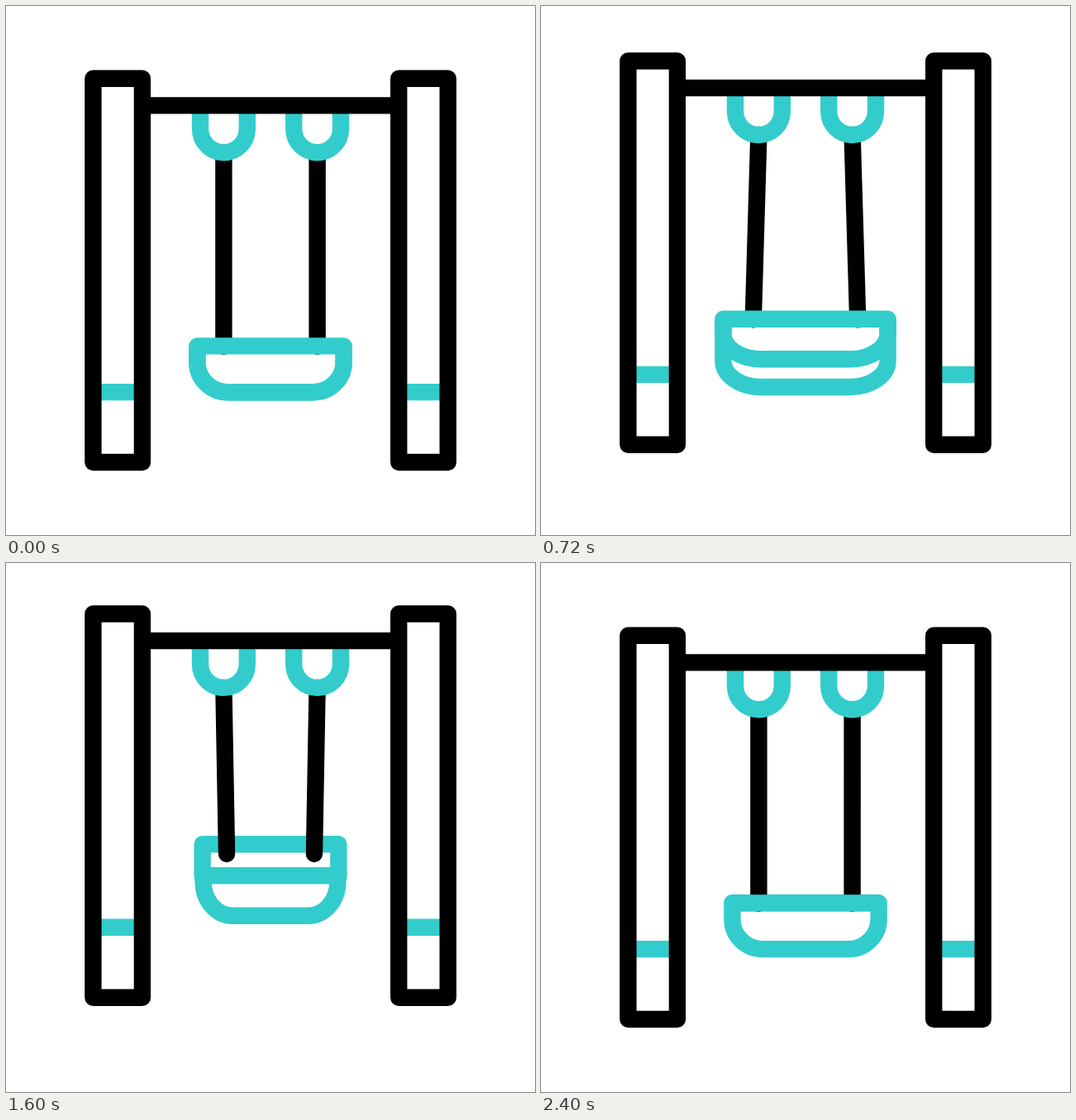
Animation of 640 by 640 pixels, one loop 2.56 s. Source, as an HTML page:

```html
<!DOCTYPE html>
<html lang="en">
<head>
<meta charset="utf-8">
<title>Swing</title>
<style>
  html, body { margin: 0; width: 100%; height: 100%; overflow: hidden; background: #fff; }
  svg { display: block; width: 100%; height: 100%; }
  path, rect { fill: none; stroke: #000; stroke-width: 20.4; stroke-linejoin: round; }
  .teal { stroke: #33cccc; }
  .rope { stroke-linecap: round; }
</style>
</head>
<body>
<svg viewBox="0 0 640 640">
  <g id="swing">
    <path id="rear" class="teal"/>
    <path id="ropes" class="rope"/>
    <path id="front" class="teal"/>
    <path class="teal" d="M235 120V148.8a28.4 28.4 0 0 0 56.8 0V120M348.2 120V148.8a28.4 28.4 0 0 0 56.8 0V120"/>
    <path d="M165 120.4H475"/>
    <path class="teal" d="M105.4 467.1H165M475.2 467.1H534.6"/>
    <rect x="105.4" y="87.8" width="59.5" height="464.2"/>
    <rect x="475.2" y="87.8" width="59.5" height="464.2"/>
  </g>
</svg>
<script>
const LOOP = 2560, STEP = 40, DELAY = 20, QUARTER = 600;
const $ = id => document.getElementById(id);
const swing = $('swing'), rear = $('rear'), ropes = $('ropes'), front = $('front');

// Cubic Bezier easing with flat ends; a and b are the handles' x values.
function ease(x, a, b) {
  if (x <= 0) return 0;
  if (x >= 1) return 1;
  let lo = 0, hi = 1, s = 0.5;
  for (let i = 0; i < 30; i++) {
    s = (lo + hi) / 2;
    const v = 3 * a * (1 - s) ** 2 * s + 3 * b * (1 - s) * s * s + s ** 3;
    if (v < x) lo = s; else hi = s;
  }
  return s * s * (3 - 2 * s);
}

const lift = q => 32.1 * ease(q < 2 ? q / 2 : (4 - q) / 2, 0.5, 0.5);

// Swing position: 1 is nearest to the viewer, -1 is farthest.
function sway(q) {
  if (q < 1) return ease(q, 0.5, 0.62);
  if (q > 3) return -ease(4 - q, 0.5, 0.62);
  const u = 2 - q;
  return Math.sign(u) * (1 - (1 - Math.abs(u)) ** 2);
}

// Rounded lower half of the seat, from the left top corner to the right one.
function bowl(half, top, inset, corner, flat, bottom) {
  const k = 0.45, l = 320 - half, r = 320 + half;
  const lx = l + inset, rx = r - inset, bl = 320 - flat, br = 320 + flat;
  const cy = bottom - (bottom - corner) * k, dx = (bl - lx) * k;
  return `M${l} ${top}L${lx} ${corner}C${lx} ${cy} ${lx + dx} ${bottom} ${bl} ${bottom}` +
    `H${br}C${rx - dx} ${bottom} ${rx} ${cy} ${rx} ${corner}L${r} ${top}`;
}

function draw(t) {
  const q = Math.min(4, Math.max(0, (t - DELAY) / QUARTER));
  const p = sway(q);
  const pose = (rest, near, far) => rest + (p > 0 ? near * p : -far * p);

  const half = pose(88.6, 11.3, -7.2);
  const top = pose(411.4, -11.7, -7.85);
  const bottom = pose(467.2, -19.3, -16.3);
  const corner = pose(431, -14, -22);
  const flat = pose(52, 2, -7);
  const inset = pose(0, 0, 1.2);
  front.setAttribute('d', bowl(half, top, inset, corner, flat, bottom) + 'Z');

  const back = pose(411.4, 0, -51.8 + 6.8);
  rear.setAttribute('d', p >= 0
    ? bowl(half, top, 0, pose(431, 20, 0), flat, pose(467.2, 15.4, 0))
    : `M${320 - half} ${top}V${pose(411.4, 0, -51.8)}H${320 + half}V${top}`);

  const spread = pose(56.6, 6.8, -4.2), end = pose(411.8, -11.7, -38.8);
  ropes.setAttribute('d',
    `M263.4 177.2L${320 - spread} ${end}M376.6 177.2L${320 + spread} ${end}`);

  swing.setAttribute('transform', `translate(0 ${-lift(q)})`);
}

const start = performance.now();
function tick() {
  const t = (performance.now() - start) % LOOP;
  draw(Math.min(2400, Math.floor(t / STEP) * STEP));
  requestAnimationFrame(tick);
}
tick();
</script>
</body>
</html>
```
